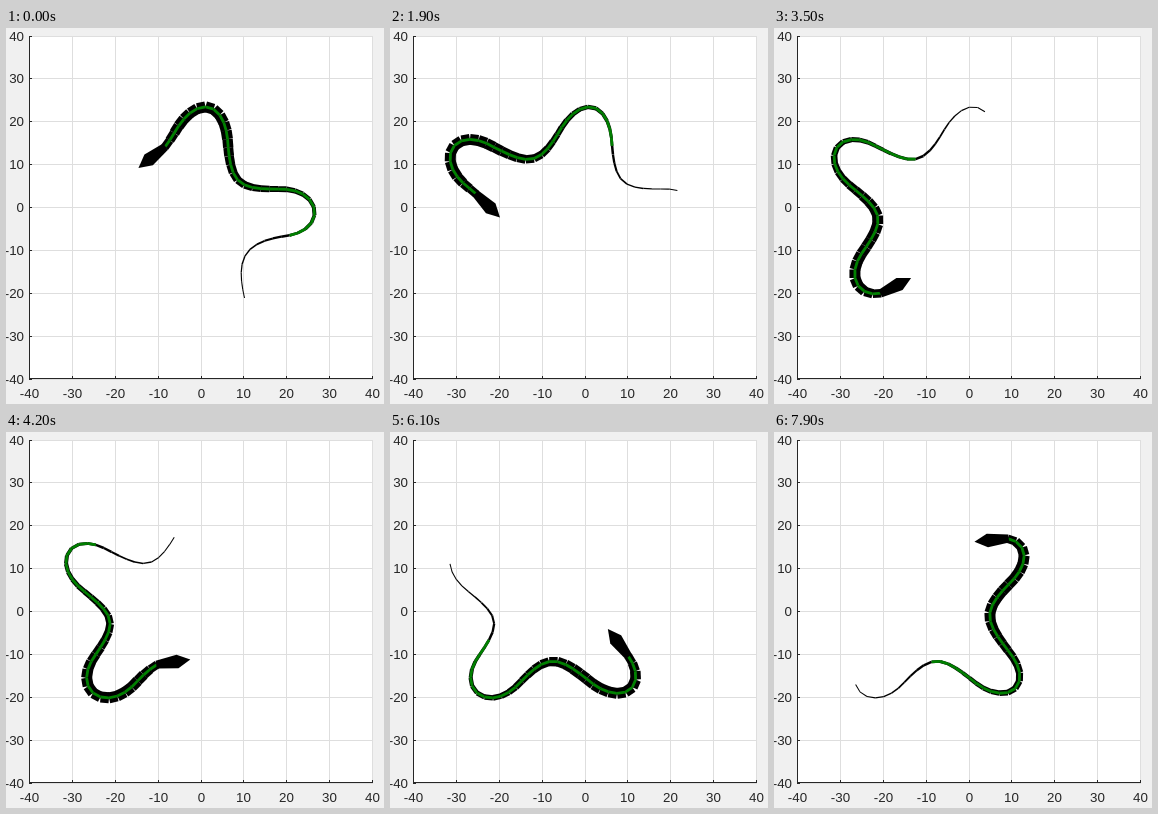
Recreate the animation shown at these times as an HTML page with a canvas. Size 378 by 376 pixels, loop 8 s.

```html
<!DOCTYPE html>
<html lang="en">
<head>
<meta charset="utf-8">
<title>Crawling snake</title>
<style>
  html, body { margin: 0; width: 100%; height: 100%; overflow: hidden; background: #f0f0f0; }
  canvas { display: block; }
</style>
</head>
<body>
<canvas id="stage" width="378" height="376"></canvas>
<script>
const ctx = document.getElementById('stage').getContext('2d');
const LOOP = 8000, STEP = 100;
const LENGTH = 367, SEGMENTS = 43, GREEN_FROM = 96, HANDLE = 42;

// Where the track changes its sense of turning: x, y, heading in degrees.
const bends = [
  [238.5, 270, 103], [280.4, 207.9, 8], [274, 161, 181], [221.8, 114, 94],
  [169.5, 103, 240], [100.5, 117.3, 152], [76.5, 158, 321], [88.5, 224.3, 235],
  [129, 251.7, 47], [200, 249.6, 321], [236, 221, 128], [237, 150, 45], [205, 113, 208]
];

// Distance crawled (px) at given times (ms).
const crawl = [[0, 0], [1100, 97], [2800, 239], [4200, 350], [5400, 436], [6800, 537], [7900, 630]];

function makeTrack() {
  const handle = ([x, y, deg], reach) => {
    const a = deg * Math.PI / 180;
    return [x + reach * Math.cos(a), y - reach * Math.sin(a)];
  };
  const curves = bends.slice(1).map((end, i) =>
    'C' + [handle(bends[i], HANDLE), handle(end, -HANDLE), handle(end, 0)]);
  const path = document.createElementNS('http://www.w3.org/2000/svg', 'path');
  path.setAttribute('d', 'M' + handle(bends[0], 0) + curves.join(''));
  return path;
}
const track = makeTrack();

function at(s) {
  const { x, y } = track.getPointAtLength(s);
  return [x, y];
}

function crawled(t) {
  const i = crawl.findIndex(([time]) => time >= t) || 1;
  const [t0, d0] = crawl[i - 1], [t1, d1] = crawl[i];
  return d0 + (d1 - d0) * (t - t0) / (t1 - t0);
}

// Thickens from the tail, narrows slightly at the neck.
function bodyWidth(s) {
  const taper = 1 + 10 * Math.min(1, s / 270) ** 1.7;
  return taper - 3 * Math.max(0, (s - LENGTH + 25) / 25);
}

function line(a, b, color, width = 1) {
  ctx.strokeStyle = color;
  ctx.lineWidth = width;
  ctx.beginPath();
  ctx.moveTo(...a);
  ctx.lineTo(...b);
  ctx.stroke();
}

function drawAxes() {
  const ink = '#262626', grid = '#dedede';
  ctx.fillStyle = '#f0f0f0';
  ctx.fillRect(0, 0, 378, 376);
  ctx.fillStyle = '#fff';
  ctx.fillRect(23, 8, 344, 343);
  const marks = [];
  for (let value = -40; value <= 40; value += 10) {
    const x = Math.round(194.5 + 4.2875 * value) + 0.5;
    const y = Math.round(179 - 4.2875 * value) + 0.5;
    marks.push({ value, x, y });
    line([x, 8], [x, 351], grid);
    line([23, y], [367, y], grid);
  }
  line([23.5, 8], [23.5, 351], ink);
  line([23, 350.5], [367, 350.5], ink);
  ctx.font = '13.33px Arial, "Liberation Sans", sans-serif';
  ctx.fillStyle = ink;
  for (const { value, x, y } of marks) {
    line([x, 348], [x, 351], ink);
    line([23, y], [26, y], ink);
    ctx.textAlign = 'center';
    ctx.fillText(value, x, 370);
    ctx.textAlign = 'right';
    ctx.fillText(value, 18, y + 4.5);
  }
}

function drawHead(s) {
  const [x, y] = at(s), [ax, ay] = at(s + 18);
  ctx.save();
  ctx.translate(x, y);
  ctx.rotate(Math.atan2(ay - y, ax - x));
  ctx.fillStyle = '#000';
  ctx.beginPath();
  for (const p of [[-1, -4], [20.5, -6.8], [33.5, 0], [20.5, 6.8], [-1, 4]]) ctx.lineTo(...p);
  ctx.fill();
  ctx.restore();
}

function drawSnake(tail) {
  const size = LENGTH / SEGMENTS;
  for (let i = 0; i < SEGMENTS; i++) {
    const s = i * size, middle = s + size / 2;
    const a = at(tail + s), b = at(tail + s + size);
    line(a, b, '#000', bodyWidth(middle));
    if (middle > GREEN_FROM) line(a, b, '#008000', 2.8);
  }
  drawHead(tail + LENGTH);
}

function frame() {
  const t = Math.floor(performance.now() % LOOP / STEP) * STEP;
  drawAxes();
  drawSnake(crawled(t));
  requestAnimationFrame(frame);
}
frame();
</script>
</body>
</html>
```
